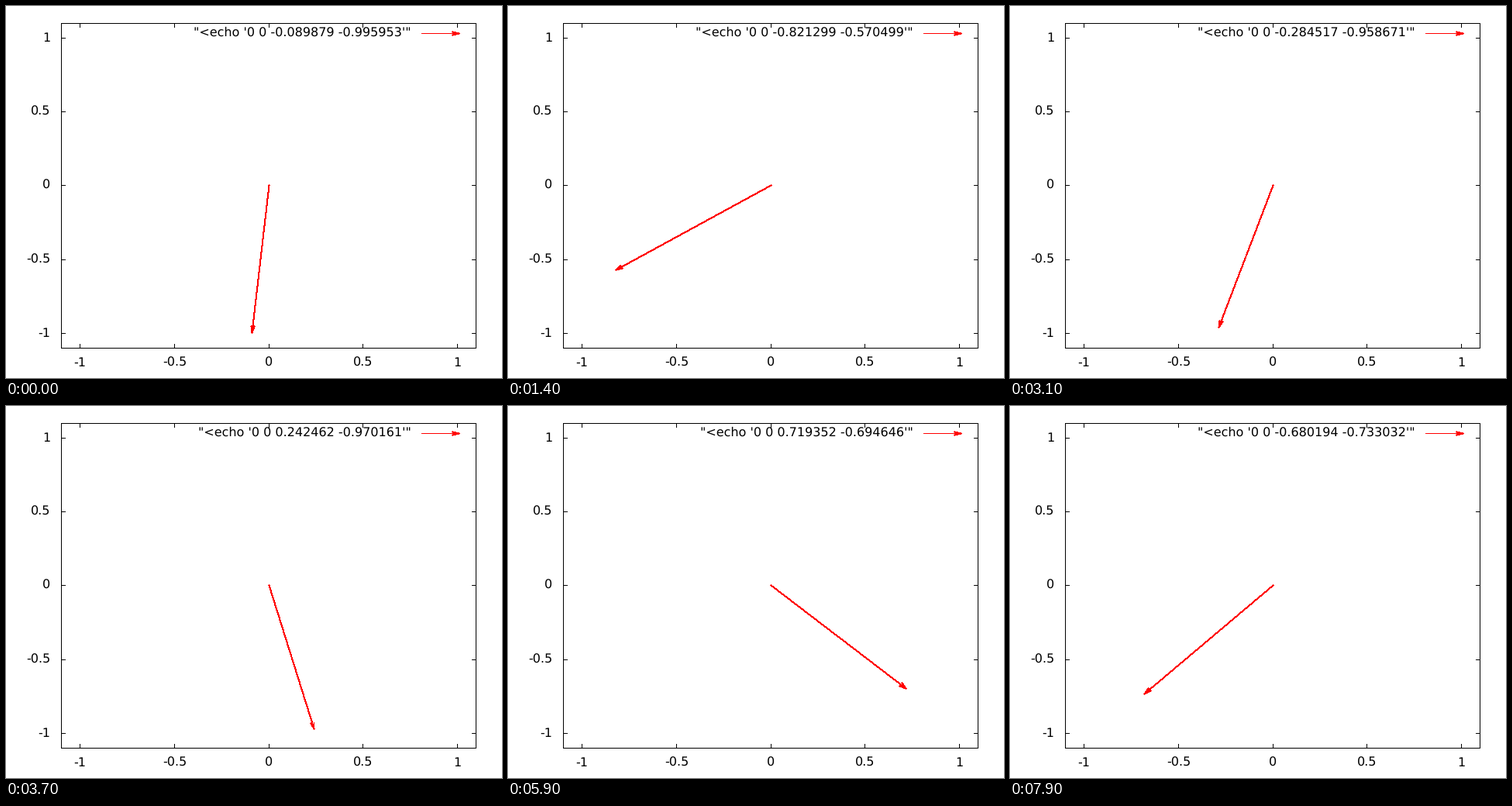
Recreate the animation shown at these times as a matplotlib script. Size 640 by 480 pixels, loop 8 s.

```python
import math

import matplotlib.pyplot as plt
from matplotlib.animation import FuncAnimation
from matplotlib.collections import LineCollection

W, H, DPI = 640, 480, 80
PX = 72 / DPI                                   # one pixel in points
LEFT, RIGHT, TOP, BOTTOM = 71, 606, 22, 441     # plot border
LIMIT = 1.1                                     # both axes run -LIMIT..LIMIT
FRAMES, DT = 80, 0.1
GRAVITY, START_SPEED = 0.9, -0.9
TIC = 5
HEAD, HEAD_ANGLE = 8.3, math.radians(15)

plt.rcParams["font.family"] = "DejaVu Sans"
plt.rcParams["text.hinting"] = "none"


def px(x):
    return math.floor(LEFT + (x + LIMIT) / (2 * LIMIT) * (RIGHT - LEFT) + 0.5)


def py(y):
    return BOTTOM - math.floor((y + LIMIT) / (2 * LIMIT) * (BOTTOM - TOP) + 0.5)


def swing():
    """Angles of the pendulum, measured from straight down."""
    angle, speed, angles = 0.0, START_SPEED, []
    for _ in range(FRAMES):
        angle += speed * DT
        angles.append(angle)
        speed -= GRAVITY * math.sin(angle) * DT
    return angles


def arrow(x0, y0, x1, y1):
    back = math.atan2(y0 - y1, x0 - x1)
    segs = [((x0, y0), (x1, y1))]
    for a in (back - HEAD_ANGLE, back + HEAD_ANGLE):
        end = (round(x1 + HEAD * math.cos(a)), round(y1 + HEAD * math.sin(a)))
        segs.append(((x1, y1), end))
    return segs


def pen_width(seg):
    """Width that keeps an aliased line one pixel thick at any slope."""
    (x0, y0), (x1, y1) = seg
    dx, dy = abs(x1 - x0), abs(y1 - y0)
    return PX * max(dx, dy) / math.hypot(dx, dy)


def lines(segs, color):
    coll = LineCollection(segs, colors=color, antialiaseds=False,
                          linewidths=[pen_width(s) for s in segs],
                          capstyle="projecting")
    coll.set_snap(False)
    return ax.add_collection(coll, autolim=False)


def label(x, y, s, ha):
    return ax.text(x, y, s, ha=ha, va="baseline", fontsize=16 * PX, color="black")


fig = plt.figure(figsize=(W / DPI, H / DPI), dpi=DPI, facecolor="white")
ax = fig.add_axes([0, 0, 1, 1])
ax.set_xlim(-0.5, W - 0.5)
ax.set_ylim(H - 0.5, -0.5)
ax.axis("off")

grid = [((LEFT, TOP), (RIGHT, TOP)), ((LEFT, BOTTOM), (RIGHT, BOTTOM)),
        ((LEFT, TOP), (LEFT, BOTTOM)), ((RIGHT, TOP), (RIGHT, BOTTOM))]
for v in (-1, -0.5, 0, 0.5, 1):
    x, y = px(v), py(v)
    grid += [((x, BOTTOM), (x, BOTTOM - TIC)), ((x, TOP), (x, TOP + TIC)),
             ((LEFT, y), (LEFT + TIC, y)), ((RIGHT, y), (RIGHT - TIC, y))]
    label(x, 464.5, f"{v:g}", "center")
    label(57, y + 4.5, f"{v:g}", "right")
lines(grid, "black")
lines(arrow(536, 35, 584, 35), "red")

angles = swing()
hand = lines(arrow(px(0), py(0), px(0), py(-1)), "red")
title = label(522, 38.5, "", "right")


def update(i):
    x, y = math.sin(angles[i]), -math.cos(angles[i])
    segs = arrow(px(0), py(0), px(x), py(y))
    hand.set_segments(segs)
    hand.set_linewidths([pen_width(s) for s in segs])
    title.set_text(f"\"<echo '0 0 {x:f} {y:f}'\"")
    return hand, title


anim = FuncAnimation(fig, update, frames=FRAMES, interval=1000 * DT,
                     repeat=True, repeat_delay=0)
plt.show()
```
